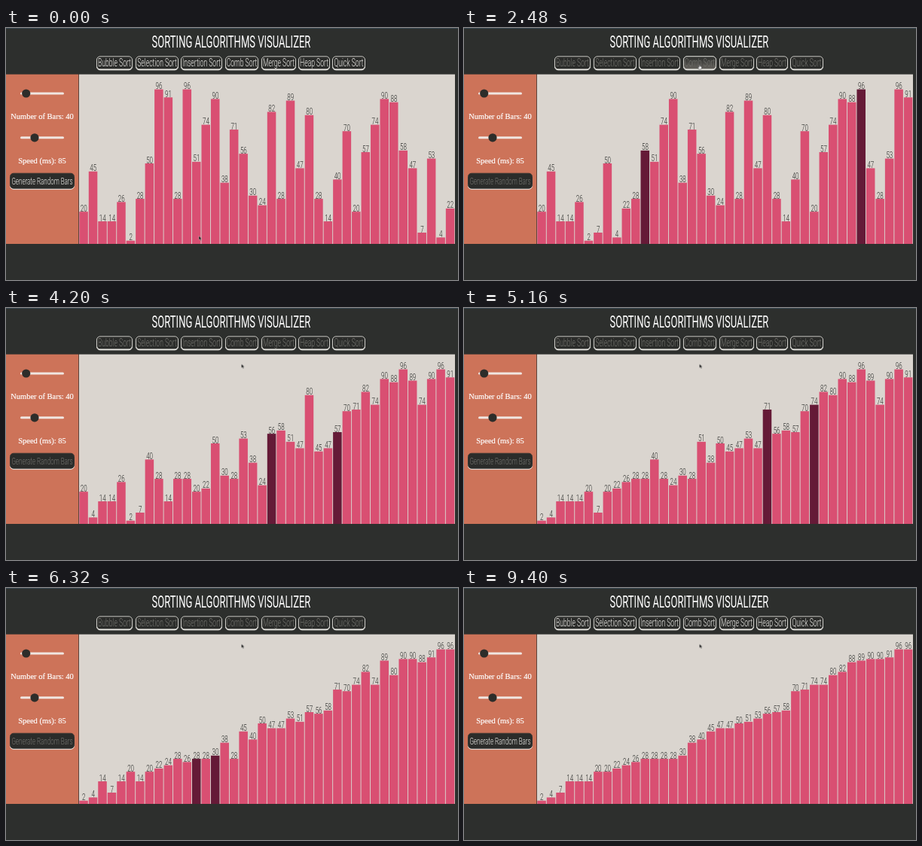
These frames come from a looping animation (600x335 px, 9440 ms). An HTML page:

```html
<!DOCTYPE html>
<html lang="en">
<head>
<meta charset="utf-8">
<title>Sorting Algorithms Visualizer</title>
<style>
  html, body { margin: 0; width: 100%; height: 100%; overflow: hidden; background: #2d2f2d; }
  svg { display: block; width: 100%; height: 100%; }
  text { text-anchor: middle; }
  .narrow { font-family: Roboto, "Open Sans", sans-serif; font-weight: 300; }
  .title { font-weight: 400; }
  .serif { font: 10.5px "Liberation Serif", "Noto Serif", serif; fill: #fff; stroke: #fff; stroke-width: .2; }
  .button text { fill: #f1f0ec; animation: disable 9440ms step-end infinite; }
  .hover { opacity: 0; animation: hover 9440ms step-end infinite; }
  #cursor { animation: travel 9440ms ease-in-out infinite; }
  #arrow { animation: arrow 9440ms step-end infinite; }
  #hand { opacity: 0; animation: hover 9440ms step-end infinite; }

  @keyframes disable {
    0%, 82.6% { fill: #f1f0ec; }
    22.85% { fill: #74746f; }
  }
  @keyframes hover {
    0%, 28.2% { opacity: 0; }
    15.7% { opacity: 1; }
  }
  @keyframes arrow {
    0%, 28.2% { opacity: 1; }
    15.7% { opacity: 0; }
  }
  @keyframes travel {
    0%, 9% { transform: translate(256px, 276.5px); }
    16.5%, 27.5% { transform: translate(312.5px, 48.5px); }
    30.5%, 100% { transform: translate(312.5px, 74.5px); }
  }
</style>
</head>
<body>
<svg id="stage" viewBox="0 0 600 335">
  <defs>
    <linearGradient id="glow" x1="0" y1="0" x2="0" y2="1">
      <stop offset="0" stop-color="#2d2f2d"/>
      <stop offset="1" stop-color="#65625d"/>
    </linearGradient>
  </defs>
  <rect width="600" height="335" fill="#2d2f2d"/>
  <rect width="600" height="1" fill="#36454f"/>
  <rect y="61.6" width="96.3" height="225.4" fill="#cd7359"/>
  <rect x="97" y="61.6" width="499" height="225.4" fill="#dad5cf"/>
  <g id="controls"></g>
  <g id="bars"></g>
  <g id="cursor">
    <path id="arrow" d="M0 0V5.2L1.3 4.1L2.2 6L3.2 5.5L2.4 3.7H4Z" fill="#111" stroke="#f4f2ee" stroke-width=".35"/>
    <path id="hand" d="M-.6 0Q0-.7.6 0V2.2L3 2.8V5L2.2 6.4H-.8L-2.2 3.8L-1.6 3.3L-.6 4Z" fill="#fff" stroke="#111" stroke-width=".5"/>
  </g>
</svg>
<script>
  const LOOP = 9440;
  const SORT_START = 2085;
  const SWAP_TIME = 88;
  const CONDENSE = 0.615;
  const BAR_STEP = 12.475;
  const UNIT = 2.14;
  const FLOOR = 287;

  const values = [
    20, 45, 14, 14, 26, 2, 28, 50, 96, 91, 28, 96, 51, 74, 90, 38, 71, 56, 30, 24,
    82, 28, 89, 47, 80, 28, 14, 40, 70, 20, 57, 74, 90, 88, 58, 47, 7, 53, 4, 22
  ];

  const byId = id => document.getElementById(id);

  function add(parent, tag, attrs, content = '') {
    const node = document.createElementNS('http://www.w3.org/2000/svg', tag);
    for (const name in attrs) node.setAttribute(name, attrs[name]);
    node.textContent = content;
    return parent.appendChild(node);
  }

  const place = (x, y) => `translate(${x} ${y}) scale(${CONDENSE} 1)`;

  function narrowText(parent, x, y, size, fill, content) {
    return add(parent, 'text', {
      class: 'narrow', transform: place(x, y), 'font-size': size, fill
    }, content);
  }

  function button(x, y, width, height, size, label, outline, hoverable) {
    const group = add(controls, 'g', { class: 'button' });
    const box = { x: x + .5, y: y + .5, width: width - 1, height: height - 2, rx: 4.5 };
    add(group, 'rect', { ...box, y: y + 1.5, fill: '#f1f0ec', stroke: '#f1f0ec' });
    add(group, 'rect', { ...box, fill: '#2b2c2a', stroke: outline, 'stroke-width': .9 });
    if (hoverable) add(group, 'rect', { ...box, class: 'hover', fill: 'url(#glow)', stroke: outline });
    narrowText(group, x + width / 2, y + height / 2 + 4, size, '#f1f0ec', label);
  }

  function slider(y, thumb, label) {
    add(controls, 'rect', { x: 19, y: y - 1.5, width: 58, height: 3, rx: 1.5, fill: '#f0e6e1' });
    add(controls, 'circle', { cx: thumb, cy: y, r: 5.6, fill: '#2d2d2a' });
    add(controls, 'text', { class: 'serif', x: 48, y: y + 34 }, label);
  }

  // Comb sort; every swap yields one state with the swapped pair marked.
  function combSort(start) {
    const list = [...start];
    const states = [{ list: start, pair: [] }];
    let gap = list.length, swapped = true;
    while (gap > 1 || swapped) {
      gap = Math.max(1, Math.floor(gap / 1.3));
      swapped = false;
      for (let i = 0; i + gap < list.length; i++) {
        if (list[i] <= list[i + gap]) continue;
        [list[i], list[i + gap]] = [list[i + gap], list[i]];
        swapped = true;
        states.push({ list: [...list], pair: [i, i + gap] });
      }
    }
    states.push({ list, pair: [] });
    return states;
  }

  const controls = byId('controls');
  narrowText(controls, 299, 25.5, 21.2, '#fff', 'SORTING ALGORITHMS VISUALIZER').classList.add('title');
  [
    ['Bubble', 120, 48], ['Selection', 172, 57], ['Insertion', 232, 55], ['Comb', 291, 44],
    ['Merge', 339, 46], ['Heap', 388, 42], ['Quick', 433, 44]
  ].forEach(([name, x, width]) =>
    button(x, 37.3, width, 19, 14, name + ' Sort', '#d8d7d2', name === 'Comb'));
  slider(87, 26.7, 'Number of Bars: 40');
  slider(145.8, 38, 'Speed (ms): 85');
  button(5, 192.7, 86, 22, 13, 'Generate Random Bars', '#2b2c2a');

  const bars = values.map((_, i) => {
    const x = 97 + i * BAR_STEP;
    return {
      center: x + BAR_STEP / 2,
      rect: add(byId('bars'), 'rect', { x: x + .3, width: BAR_STEP - .95 }),
      label: narrowText(byId('bars'), 0, 0, 13, '#2d2f2d', '')
    };
  });

  const states = combSort(values);
  let shown = -1;

  function render(time) {
    const step = Math.floor((time - SORT_START) / SWAP_TIME);
    const index = Math.max(0, Math.min(states.length - 1, step));
    if (index === shown) return;
    shown = index;
    const { list, pair } = states[index];
    bars.forEach(({ center, rect, label }, i) => {
      const height = list[i] * UNIT;
      rect.setAttribute('y', FLOOR - height);
      rect.setAttribute('height', height);
      rect.setAttribute('fill', pair.includes(i) ? '#651a37' : '#d94f72');
      label.setAttribute('transform', place(center, FLOOR - height - .5));
      label.textContent = list[i];
    });
  }

  let origin;
  function tick(now) {
    origin ??= now;
    render((now - origin) % LOOP);
    requestAnimationFrame(tick);
  }
  render(0);
  requestAnimationFrame(tick);
</script>
</body>
</html>
```
